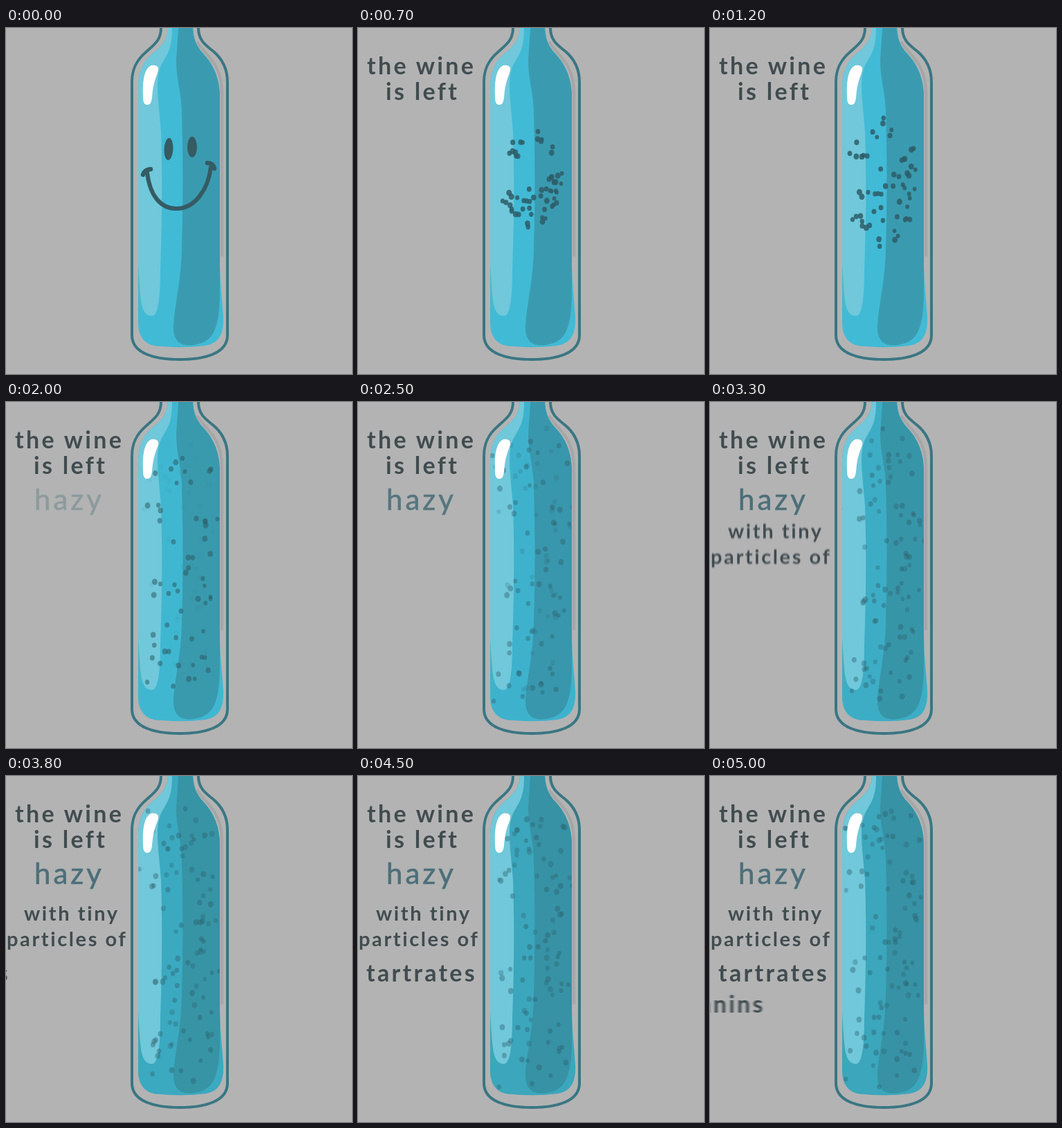
Animation of 500 by 500 pixels, one loop 5.1 s. Source, as an HTML page:

```html
<!DOCTYPE html>
<html lang="en">
<head>
<meta charset="utf-8">
<title>Hazy wine</title>
<style>
  html, body { margin: 0; width: 100%; height: 100%; overflow: hidden; background: #b3b3b3; }
  svg { display: block; width: 100vw; height: 100vh; }
  text { font: 700 34px Lato, "Open Sans", sans-serif; letter-spacing: 3.3px; fill: #414c4f; }
  .small { font-size: 29px; letter-spacing: 2.6px; }
  #hazy { font-size: 42px; font-weight: 400; letter-spacing: 4px; fill: #4c6f79; stroke: #4c6f79; stroke-width: .6; }
</style>
</head>
<body>
<svg viewBox="0 0 500 500">
  <defs>
    <path id="liquid" d="M234 0C233 18 224 27 213 36C198 48 191 63 191 88V425C191 449 203 460 224 460Q258 463 288 459C307 456 315 443 314 418C313 395 309 370 309 330V96C308 69 298 51 285 37C275 26 271 16 270 0Z"/>
    <clipPath id="inside"><use href="#liquid"/></clipPath>
    <filter id="blurY" x="-20%" y="-60%" width="140%" height="220%">
      <feGaussianBlur stdDeviation="0"/>
    </filter>
    <filter id="blurX" x="-20%" y="-20%" width="140%" height="140%">
      <feGaussianBlur stdDeviation="0"/>
    </filter>
  </defs>

  <rect width="500" height="500" fill="#b3b3b3"/>
  <path d="M224 0C224 18 214 24 202 35C188 47 182 60 182 78V444C182 470 214 479 251 479S320 470 320 444V78C320 60 314 46 300 34C287 24 278 17 278 0" fill="none" stroke="#3a7683" stroke-width="4"/>
  <path d="M276 20C290 42 311 50 312 92V330" fill="none" stroke="#a2a2a2" stroke-width="4" opacity=".7"/>

  <use href="#liquid" fill="#41bad6"/>
  <g clip-path="url(#inside)">
    <path d="M249 0H320V90H309V380C309 440 297 454 272 458C252 461 241 452 242 430C244 400 253 365 254 320Q257 220 254 120C253 90 246 75 246 45Q248 20 249 0Z" fill="#3a9bb0"/>
    <rect id="haze" x="180" width="150" height="480" fill="#2f828e" opacity="0"/>
    <path d="M230 0H240C240 28 235 35 224 54C215 75 220 100 224 150Q227 240 223 350Q223 416 211 416C201 416 196 408 194 385Q189 330 189 250V40Z" fill="#70c8da"/>
    <g id="dots" fill="#2d5d69"></g>
  </g>
  <path d="M210 54C219 53 222 57 219 65C213 80 212 89 211 101C210 108 208 111 204 111C199 111 198 106 198 98C197 76 200 58 210 54Z" fill="#fff"/>

  <g id="face" fill="#355b63">
    <ellipse cx="235" cy="175" rx="6.5" ry="16" transform="rotate(3 235 175)"/>
    <ellipse cx="269" cy="172" rx="7" ry="15"/>
    <g fill="none" stroke="#355b63" stroke-linecap="round">
      <path d="M204 209C208 243 224 261 246 261C272 261 292 235 296 201" stroke-width="6"/>
      <path d="M198 212Q200 205 209 204M291 195Q299 195 301 203" stroke-width="6.5"/>
    </g>
  </g>

  <g id="drop" filter="url(#blurY)">
    <text class="small" x="26" y="209">with tiny</text>
    <text class="small" x="1" y="246">particles of</text>
  </g>
  <g id="intro">
    <text x="13" y="67">the wine</text>
    <text x="40" y="104">is left</text>
  </g>
  <text id="hazy" x="41" y="156">hazy</text>
  <text id="tartrates" x="12" y="297">tartrates</text>
  <g id="tannins" filter="url(#blurX)"><text x="24" y="342">tannins</text></g>
</svg>
<script>
const LOOP = 5100, STEP = 100;
const $ = id => document.getElementById(id);
const clamp = v => Math.max(0, Math.min(1, v));
const mix = (a, b, u) => a + (b - a) * u;
const ramp = (t, a, b) => clamp((t - a) / (b - a));
const easeOut = u => 1 - (1 - u) ** 2;
const smooth = u => u * u * (3 - 2 * u);

let seed = 23;
const rand = () => (seed = seed * 16807 % 2147483647) / 2147483647;

// Point on an eye or on the smile for a direction within the unit disc
function facePoint(dx, dy) {
  if (dy < -.35) return [dx < 0 ? 235 : 269, mix(162, 186, rand())];
  return [250 + 47 * dx, 261 - 56 * dx * dx];
}

function makeDot(late) {
  const el = document.createElementNS("http://www.w3.org/2000/svg", "ellipse");
  const size = mix(2.8, 4, rand());
  el.setAttribute("rx", size);
  el.setAttribute("ry", size * 1.12);
  $("dots").append(el);

  const angle = rand() * 2 * Math.PI, radius = Math.sqrt(rand());
  const dx = radius * Math.cos(angle), dy = radius * Math.sin(angle);
  // The disc's columns stretch to fill the bottle
  const home = [250 + 57 * dx, 242 + 192 * dy / Math.sqrt(1 - dx * dx)];
  return {
    el, late, home,
    face: facePoint(dx, dy),
    cloud: [249 + 53 * dx, 222 + 94 * dy],
    phase: rand() * 2 * Math.PI,
    speed: mix(1.5, 3, rand())
  };
}

const dots = Array.from({ length: 94 }, (_, i) => makeDot(i >= 58));

function moveDots(t) {
  const burst = easeOut(ramp(t, 500, 1200));
  const spread = easeOut(ramp(t, 1200, 2800));
  const sway = 16 * ramp(t, 1200, 2400);
  const shade = mix(.85, .4, ramp(t, 1200, 2400)) * ramp(t, 400, 700);
  const lateShade = .32 * ramp(t, 1800, 3000);
  for (const { el, late, face, cloud, home, phase, speed } of dots) {
    const a = phase + speed * t / 1000;
    const place = i => mix(mix(face[i], cloud[i], burst), home[i], spread);
    el.setAttribute("cx", place(0) + sway * .5 * Math.cos(a));
    el.setAttribute("cy", place(1) + sway * Math.sin(a));
    el.setAttribute("opacity", late ? lateShade : shade);
  }
}

const shift = (id, x, y) => $(id).setAttribute("transform", `translate(${x} ${y})`);
const fade = (id, v) => $(id).setAttribute("opacity", v);
const soften = (id, x, y) =>
  $(id).firstElementChild.setAttribute("stdDeviation", `${x} ${y}`);
const slideIn = (id, t, from, to, distance) =>
  shift(id, -distance * (1 - easeOut(ramp(t, from, to))), 0);

function draw(t) {
  fade("face", 1 - ramp(t, 400, 700));
  fade("haze", .36 * ramp(t, 1500, 4200));
  moveDots(t);

  slideIn("intro", t, 100, 700, -232);
  fade("intro", ramp(t, 0, 500));

  fade("hazy", mix(.36, 1, ramp(t, 2000, 2600)) * ramp(t, 1800, 2000));

  shift("drop", 0, -160 * (1 - smooth(ramp(t, 2800, 3400))));
  fade("drop", t < 2800 ? 0 : mix(.4, 1, ramp(t, 2800, 3300)));
  soften("blurY", 0, 4 * (1 - ramp(t, 2900, 3400)));

  slideIn("tartrates", t, 3700, 4180, 265);
  slideIn("tannins", t, 4800, 5260, 245);
  soften("blurX", 3 * (1 - ramp(t, 4800, 5260)), 0);
}

const start = performance.now();
function tick() {
  const t = (performance.now() - start) % LOOP;
  draw(Math.floor(t / STEP) * STEP);
  requestAnimationFrame(tick);
}
tick();
</script>
</body>
</html>
```
